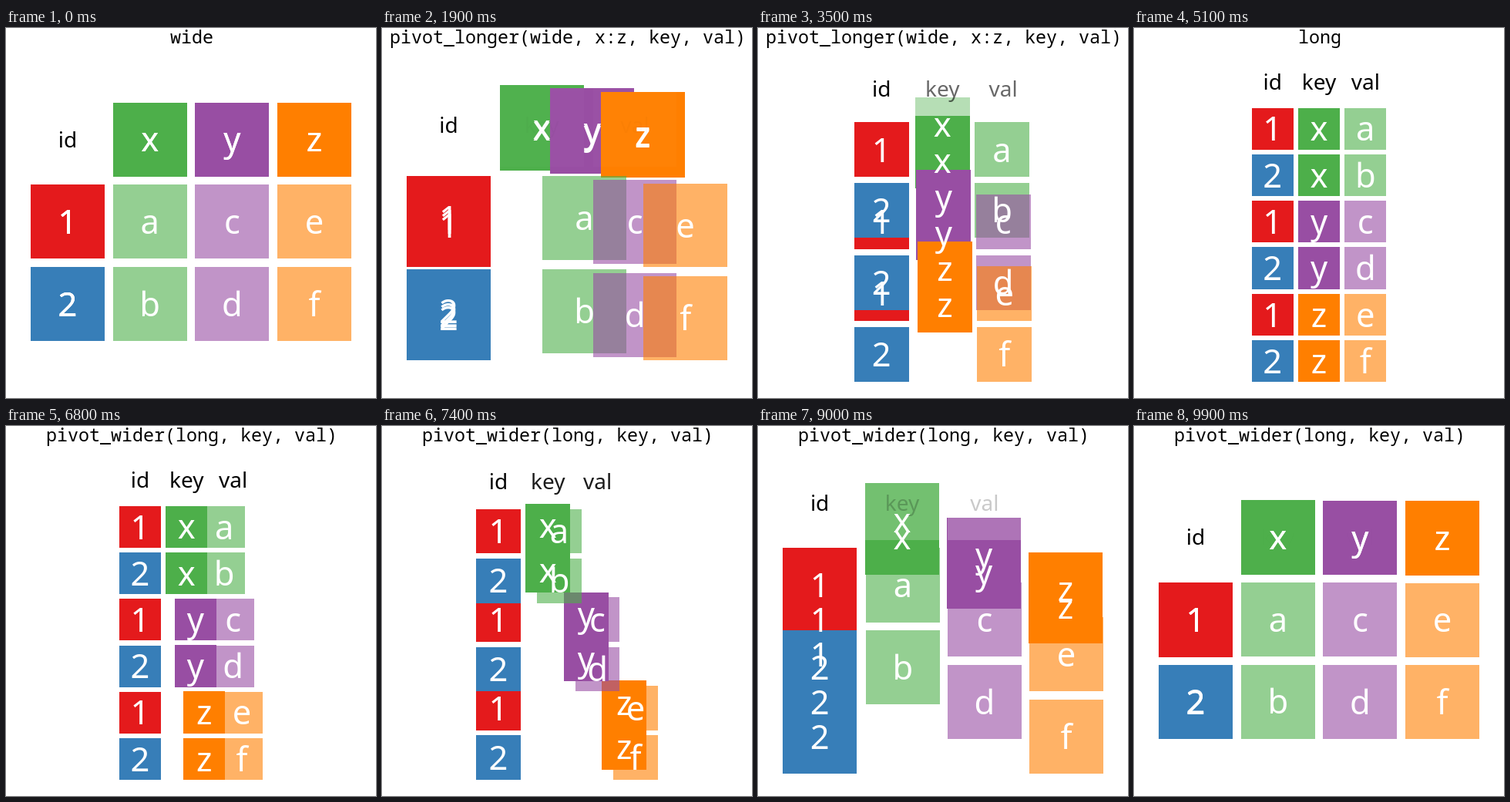
An HTML page with a canvas that plays this animation: 480x480 px, repeating every 10000 ms.

```html
<!DOCTYPE html>
<html lang="en">
<head>
<meta charset="utf-8">
<title>Wide and long tables</title>
<style>
  html, body { margin: 0; overflow: hidden; background: #fff; }
  canvas { display: block; }
</style>
</head>
<body>
<canvas id="stage" width="480" height="480"></canvas>
<script>
const ctx = document.getElementById('stage').getContext('2d');
const BOX = 416, CX = 240, CY = 251.3, TILE = 0.9;
const ID_COLORS = ['#e41a1c', '#377eb8'];
const KEY_COLORS = ['#4daf4a', '#984ea3', '#ff7f00'];

const lerp = (a, b, p) => a + (b - a) * p;
const sineInOut = u => (1 - Math.cos(Math.PI * u)) / 2;
const expOut = u => u >= 1 ? 1 : 1 - 2 ** (-10 * u);

// Title, progress and direction for a step of 100 ms
function phase(step) {
  if (step < 17) return ['wide', 0, false];
  if (step < 51) return ['pivot_longer(wide, x:z, key, val)', (step - 16) / 34, false];
  if (step < 68) return ['long', 0, true];
  return ['pivot_wider(long, key, val)', (step - 67) / 33, true];
}

// Cells for a table that is lx (columns) and ly (rows) of the way to long, in drawing order
function layout(lx, ly, back) {
  const ids = [], keys = [], vals = [];
  for (let i = 0; i < 6; i++) {
    const id = i % 2, k = i >> 1, row = lerp(1 + id, 1 + i, ly);
    ids.push({ col: 0, row, color: ID_COLORS[id], text: '12'[id] });
    keys.push({ col: lerp(1 + k, 1, lx), row: lerp(0, 1 + i, ly), color: KEY_COLORS[k], text: 'xyz'[k] });
    vals.push({ col: lerp(1 + k, 2, lx), row, color: KEY_COLORS[k], alpha: 0.6, text: 'abcdef'[i] });
  }
  ids.sort((a, b) => a.text - b.text);
  if (!back) return [...ids, ...keys, ...vals];
  const groups = [4, 2, 0].flatMap(i => [...vals.slice(i, i + 2), ...keys.slice(i, i + 2)]);
  return [...ids, ...groups];
}

function draw(step) {
  const [title, u, back] = phase(step);
  const lx = back ? 1 - expOut(u) : expOut(u);
  const ly = back ? 1 - sineInOut(u) : sineInOut(u);

  // The view always fits the whole table
  const unit = BOX / Math.max(3 - lx + TILE, 2 + 4 * ly + TILE);
  const px = col => CX + (col - (3 - lx) / 2) * unit;
  const py = row => CY + (row - (1 + 2 * ly)) * unit;

  const tile = ({ col, row, color, alpha = 1 }) => {
    const half = TILE * unit / 2;
    const x = Math.round(px(col) - half), y = Math.round(py(row) - half);
    ctx.globalAlpha = alpha;
    ctx.fillStyle = color;
    ctx.fillRect(x, y, Math.round(px(col) + half) - x, Math.round(py(row) + half) - y);
  };
  const label = ({ col, row, text, alpha = 1 }, drop) => {
    ctx.globalAlpha = alpha;
    ctx.fillText(text, px(col), py(row) + drop);
  };

  const cells = layout(lx, ly, back);
  const heads = ['id', 'key', 'val'].map((text, col) =>
    ({ text, col, row: 0, color: '#fff', alpha: col ? ly : 1 }));

  ctx.globalAlpha = 1;
  ctx.fillStyle = '#fff';
  ctx.fillRect(0, 0, 480, 480);
  cells.forEach(tile);
  heads.forEach(tile);

  ctx.textAlign = 'center';
  ctx.fillStyle = '#fff';
  ctx.font = '43.5px "Noto Sans", "Open Sans", sans-serif';
  cells.forEach(c => label({ ...c, alpha: 1 }, 15.7));
  ctx.fillStyle = '#000';
  ctx.font = '28px "Noto Sans", "Open Sans", sans-serif';
  heads.forEach(h => label(h, 10));

  ctx.globalAlpha = 1;
  ctx.font = '23.33px "Noto Sans Mono", "DejaVu Sans Mono", monospace';
  ctx.fillText(title, 241, 20);
}

const start = performance.now();
function tick() {
  draw(Math.floor((performance.now() - start) / 100) % 100);
  requestAnimationFrame(tick);
}
tick();
</script>
</body>
</html>
```
